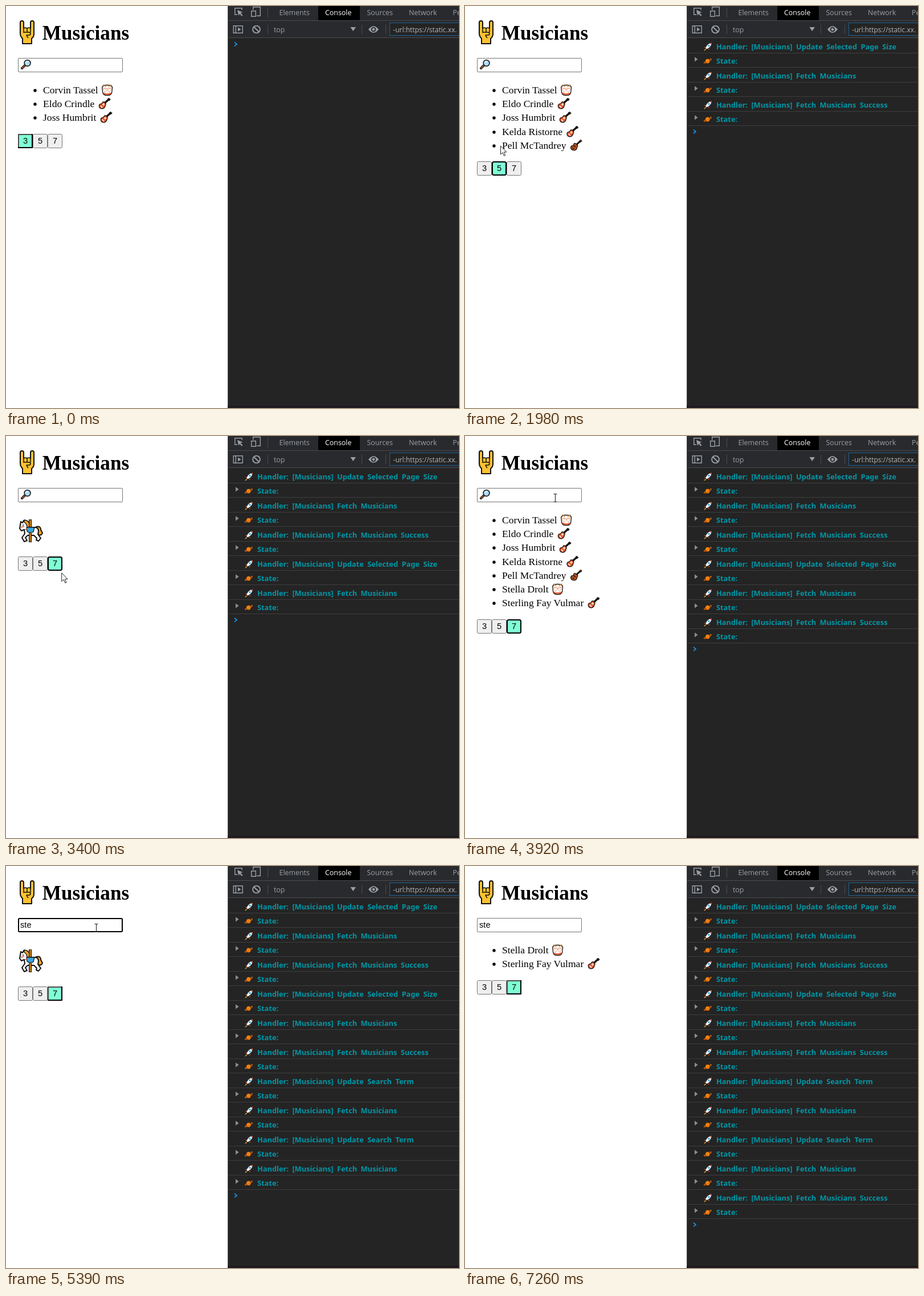
An HTML page that plays this animation: 795x704 px, repeating every 7340 ms.

```html
<!DOCTYPE html>
<html lang="en">
<head>
<meta charset="utf-8">
<title>Musicians</title>
<style>
  html, body { margin: 0; width: 100%; height: 100%; overflow: hidden; background: #fff; }
  svg { display: block; }
  .serif { font: 17.6px "Liberation Serif", serif; }
  .title { font: bold 35.2px "Liberation Serif", serif; }
  .field { font: 14.67px "Liberation Sans", sans-serif; }
  .tool { font: 12.4px "Open Sans", "Noto Sans", sans-serif; fill: #9aa0a6; }
  .log { font: bold 12.8px "Noto Sans", sans-serif; word-spacing: 3.1px; fill: #0097a7; }
  .line { fill: none; stroke: #9aa0a6; stroke-width: 1.4; }
  .rule { stroke: #3d3d3d; }
</style>
</head>
<body>
<svg id="stage" width="795" height="704" viewBox="0 0 795 704">
  <defs>
    <g id="guitar" stroke="#111" stroke-linejoin="round">
      <path d="M9 11L18 3" stroke-width="3.4"/>
      <path d="M16 2.2L18.5 .8L20.8 3.2L18.6 5.4Z" fill="#222"/>
      <path d="M7.6 7.6C9.5 6.4 13.6 9.8 12.6 12.2C11.8 13.6 11.8 14.6 11 16.6C9 20.6 2 20.4 1 15.4C.4 12 3 10.8 5 10.6C6.6 10.4 6.4 8.4 7.6 7.6Z" fill="#e0532b" stroke-width="1.2"/>
      <path d="M3.6 14.2L6.8 17.4" stroke="#fff" stroke-width="1.6"/>
      <circle cx="8.6" cy="12" r="1.9" fill="#f8d9b0" stroke="none"/>
    </g>
    <g id="violin" stroke="#111" stroke-linejoin="round">
      <path d="M9 11L18.6 2.4" stroke-width="3"/>
      <path d="M16.6 2L18.8 .8L20.6 3L18.4 5Z" fill="#8a3b16"/>
      <path d="M7 7.2C9.4 5.6 14.4 10.4 12.8 12.6C11.4 13.4 12.2 15.6 11 17.4C8.4 20.8 1.4 19.2 1 14.6C.8 11.6 3.2 10.8 4.8 10.8C6.4 10.4 5.6 8.4 7 7.2Z" fill="#b5501f" stroke-width="1.2"/>
      <path d="M4 14.4L6.4 16.8M6.5 10.8L9.4 13.7" stroke-width="1.3"/>
    </g>
    <g id="drum" stroke="#151515" stroke-linejoin="round">
      <path d="M1 6Q2 2 10 2Q18 2 19 6L18 15Q17 20 10 20Q3 20 2 15Z" fill="#fff" stroke-width="1.3"/>
      <path d="M2.5 14.8Q10 18.8 17.5 14.8L17 16.8Q15 19.3 10 19.3Q5 19.3 3 16.8Z" fill="#e0532b" stroke="none"/>
      <path d="M2.4 8L6 15L10 10L14 15L17.6 8" fill="none" stroke="#e8a070" stroke-width=".9"/>
      <path d="M2.4 6.6Q10 11 17.6 6.6" fill="none" stroke="#e0532b" stroke-width=".9"/>
      <path d="M2.4 1L8 5.6M17.6 1L12 5.6" stroke="#e8953a" stroke-width="1.4"/>
    </g>
    <g id="rocket" stroke-linejoin="round">
      <path d="M4 7L1 10L4.2 10.6M8.6 11.8L9.4 14.8L12 11" fill="#e0532b" stroke="#111" stroke-width=".7"/>
      <path d="M3.6 11.4L1 15.4L5 13" fill="#ffb92e"/>
      <path d="M15 1C10.6 1 6.4 4 3.8 10L6 12.4C12 9.6 15 5.6 15 1Z" fill="#eef4f8" stroke="#111" stroke-width=".7"/>
      <path d="M15 1L11.4 1.8L14.2 4.6Z" fill="#e0532b"/>
      <circle cx="10" cy="6" r="1.7" fill="#30a9df"/>
    </g>
    <g id="planet">
      <circle cx="7.8" cy="8" r="4.2" fill="#f7830d" stroke="#111" stroke-width=".6"/>
      <path d="M3.8 8.8C.4 11 .8 12.2 5 10.8C9.6 9.2 14.8 5.8 14.2 4.6C13.8 4 12.6 4.2 11.4 4.8" fill="none" stroke="#e06a12" stroke-width="1.2"/>
    </g>
    <path id="row-arrow" d="M403 89.2L408.6 93.3L403 97.4Z" fill="#8b8f94"/>
  </defs>

  <g id="page">
    <g stroke="#111" stroke-width="2" stroke-linejoin="round" fill="#fdc12f">
      <path d="M25 29Q25 26 28 26Q31 26 31 29V39H43V29Q43 26 46 26Q49 26 49 29V49Q49 54 45 57V66H29V57Q25 53 25 48Z"/>
      <path d="M31 47V40Q31 38 34 38Q37 38 37 40V46M37 46V40Q37 38 40 38Q43 38 43 40V46" stroke-width="1.5"/>
      <path d="M31 46H40Q43 46 43 48.5Q43 51 40 51H36Q37 54 39 56" fill="none" stroke-width="1.5"/>
    </g>
    <text class="title" x="63.7" y="58.7">Musicians</text>
    <rect id="box" rx="1.5" fill="#fff"/>
    <g id="lens" stroke-linecap="round">
      <path d="M28 109L33.4 103.8" stroke="#111" stroke-width="4"/>
      <path d="M28.2 108.8L32.6 104.6" stroke="#a05a2c" stroke-width="2"/>
      <circle cx="37.6" cy="100" r="5.4" fill="#a9dcf8" stroke="#222" stroke-width="1.7"/>
      <path d="M34.6 99Q36 96.6 38.4 96.8" fill="none" stroke="#fff" stroke-width="1.3"/>
    </g>
    <text id="typed" class="field" x="25" y="107.6"></text>
    <path id="squiggle" fill="none" stroke="#e03030"/>
    <rect id="caret" y="94" width="1" height="17"/>
    <g id="list"></g>
    <g id="horse" stroke="#111" stroke-width="2" stroke-linejoin="round">
      <path d="M53 159Q61 157 61 164L64 170Q62 175 57 173Q54 170 55 165Z" fill="#f7a823"/>
      <path d="M26 150L29 152L31 148L35 151Q40 154 40 160H51Q57 160 57 167L56 172L61 179L57 184L53 182L54 179L49 174H38L34 178L37 183L32 185L28 178L33 171L32 164L27 166L24 162Z" fill="#fff"/>
      <path d="M32 147Q42 148 42 159L37 160Q37 154 32 151Z" fill="#f7a823" stroke-width="1.4"/>
      <path d="M36 160H50L48 168Q41 171 37 167Z" fill="#35a7dd" stroke-width="1.2"/>
      <path d="M42.5 146V159M42.5 170V186" stroke-width="5"/>
      <path d="M42.5 146.5V159M42.5 170V185" stroke="#d98a1f" stroke-width="2.4"/>
      <path d="M26 160L32 158M33 164L37 163" stroke="#e0532b" stroke-width="1.5"/>
      <circle cx="30" cy="156" r="1" fill="#111" stroke="none"/>
    </g>
    <g id="buttons"></g>
  </g>

  <g id="tools">
    <rect x="389" width="406" height="704" fill="#242424"/>
    <rect x="389" width="406" height="55.5" fill="#292a2d"/>
    <rect x="548" width="73" height="25" fill="#000"/>
    <path d="M389 25.5H795M389 55.5H795" stroke="#494c50"/>
    <path d="M389.5 0V704" stroke="#45484c"/>
    <path d="M389 702H795" stroke="#1f1b20" stroke-width="4"/>
    <path d="M459.5 3V20M459.5 33V49M624.5 33V49M666.5 33V49" stroke="#494c50"/>
    <g class="line">
      <path d="M406 15H401.7V3.7H414V7"/>
      <path d="M406 7L415.5 11L411.6 12.2L415.5 16.2L413.8 17.8L410 13.8L408.2 17Z" fill="#9aa0a6" stroke="none"/>
      <path d="M433.7 7V1.7H446.3V17.3H440M430.7 8.7H438.3V18.3H430.7Z"/>
      <path d="M399.2 34.7H415.2V47.3H399.2ZM403.2 34.7V47.3"/>
      <path d="M407 37.4L412.4 41L407 44.6Z" fill="#9aa0a6" stroke="none"/>
      <circle cx="439.5" cy="41" r="6.4" stroke-width="1.9"/>
      <path d="M435 36.5L444 45.5" stroke-width="1.9"/>
      <path d="M604.5 37H614L609.2 44Z" fill="#9aa0a6" stroke="none"/>
      <path d="M636 41Q645 29.5 654 41Q645 52.5 636 41Z" fill="#9aa0a6" stroke="none"/>
      <circle cx="645" cy="41" r="3.4" fill="#9aa0a6" stroke="#292a2d" stroke-width="1.8"/>
    </g>
    <rect x="673.5" y="29.5" width="130" height="22" fill="#242424" stroke="#1d6296"/>
    <g class="tool">
      <text x="479.5" y="15.5">Elements</text>
      <text x="560" y="15.5" fill="#fff">Console</text>
      <text x="633.5" y="15.5">Sources</text>
      <text x="707" y="15.5">Network</text>
      <text x="784" y="15.5">Performance</text>
      <text x="470" y="45.5">top</text>
      <text x="679.3" y="45.5" style="font-size:12px;fill:#b4b8bd">-url:https://static.xx.</text>
    </g>
    <g id="log"></g>
    <path id="prompt" d="M401 -3.4L405 0L401 3.4" fill="none" stroke="#1f93e6" stroke-width="1.7"/>
  </g>

  <circle id="press" r="13" fill="#f9ef24" fill-opacity=".75"/>
  <path id="arrow" d="M0 0V15L3.5 11.8L6 17.6L8.2 16.6L5.8 11H10.4Z" fill="#fff" stroke="#222"/>
  <path id="beam" d="M-3 -6.5H-1L0 -5.5L1 -6.5H3M0 -5.5V6.5M-3 7.5H-1L0 6.5L1 7.5H3" fill="none" stroke="#222" stroke-width="1.1"/>
</svg>

<script>
const LOOP = 7340, ROW = 24.2, LINE = 25.5;
const $ = id => document.getElementById(id);

function set(el, attrs) {
  for (const key in attrs) el.setAttribute(key, attrs[key]);
}
function add(parent, tag, attrs = {}, text) {
  const el = document.createElementNS('http://www.w3.org/2000/svg', tag);
  set(el, attrs);
  if (text !== undefined) el.textContent = text;
  return parent.appendChild(el);
}
const show = (el, on) => el.style.display = on ? '' : 'none';
const move = (el, x, y) => el.setAttribute('transform', `translate(${x} ${y})`);
const at = (track, t) => track.filter(key => key[0] <= t).pop();
const within = (t, ...spans) => spans.some(([a, b]) => t >= a && t < b);
const lineY = i => Math.floor(LINE * i);

// Places a rect so that its border lies inside the given box
function frame(el, x, y, w, h, border) {
  set(el, {
    x: x + border / 2, y: y + border / 2,
    width: w - border, height: h - border, 'stroke-width': border
  });
}

// Timeline: each key is [ms, value...]
const shown = [[0, 0, 3], [970, 0, 0], [1520, 0, 5], [2930, 0, 0], [3470, 0, 7], [4700, 0, 0], [5630, 5, 7]];
const logged = [[0, 0], [970, 4], [1520, 6], [2930, 10], [3470, 12], [4700, 16], [5160, 20], [5630, 22]];
const selected = [[0, 0], [970, 1], [2930, 2]];
const typing = [[0, ''], [4390, 's'], [4700, 'st'], [4850, 'ste']];
// [start, steps, ms per step, from x, y, to x, y]
const moves = [
  [190, 8, 80, 266, 423, 62, 244],
  [1980, 10, 80, 62, 244, 81, 276],
  [3230, 10, 76.6, 81, 276, 158.5, 108]
];

const musicians = [
  ['Corvin Tassel', 'drum'], ['Eldo Crindle', 'guitar'], ['Joss Humbrit', 'guitar'],
  ['Kelda Ristorne', 'guitar'], ['Pell McTandrey', 'violin'], ['Stella Drolt', 'drum'],
  ['Sterling Fay Vulmar', 'guitar']
].map(([name, icon]) => {
  const g = add($('list'), 'g');
  add(g, 'circle', { cx: 51, cy: 148, r: 2.7 });
  const label = add(g, 'text', { class: 'serif', x: 65, y: 153 }, name);
  const gap = icon === 'drum' ? 6 : 7;
  add(g, 'use', { href: '#' + icon, x: 65 + label.getComputedTextLength() + gap, y: 136.5 });
  return g;
});

const buttons = [3, 5, 7].map((n, i) => {
  const g = add($('buttons'), 'g', { transform: `translate(${21 + 26 * i} 0)` });
  const face = add(g, 'rect');
  const edge = add(g, 'path', { d: 'M1 24V1H25', fill: 'none', stroke: '#4c4c4c', 'stroke-width': 2 });
  const shade = add(g, 'path', { d: 'M0 24H25V0', fill: 'none', stroke: '#000', 'stroke-width': 2 });
  add(g, 'text', { class: 'field', x: 13, y: 17.4, 'text-anchor': 'middle' }, n);
  return { face, edge, shade };
});

const [size, fetching, success, search] =
  ['Update Selected Page Size', 'Fetch Musicians', 'Fetch Musicians Success', 'Update Search Term'];
const actions = [size, fetching, success, size, fetching, success, search, fetching, search, fetching, success];
const lines = actions.flatMap(a => [`Handler: [Musicians] ${a}`, 'State:']).map((text, i) => {
  const g = add($('log'), 'g', { transform: `translate(0 ${lineY(i)})` });
  const state = i % 2;
  add(g, 'path', { class: 'rule', d: 'M390 82.5H795' });
  add(g, 'use', { href: state ? '#planet' : '#rocket', x: 418, y: 63.5 });
  if (state) add(g, 'use', { href: '#row-arrow', y: -25 });
  add(g, 'text', { class: 'log', x: 441, y: 76 }, text);
  return g;
});

$('squiggle').setAttribute('d', 'M25 110' + 'l2 -2l2 2'.repeat(5));

function pointer(t) {
  const m = at(moves, t);
  if (!m) return null;
  const [start, steps, ms, x0, y0, x1, y1] = m;
  const p = Math.min(1, (Math.floor((t - start) / ms) + 1) / steps);
  const e = p * p * (3 - 2 * p);
  return { x: x0 + (x1 - x0) * e, y: y0 + (y1 - y0) * e };
}

function styleButton({ face, edge, shade }, on, focus, hover, down) {
  frame(face, 0, 0, 26, 25, on ? 2 : 1);
  set(face, {
    rx: on ? (focus ? 2.5 : 0) : 2,
    fill: on ? '#7fffd4' : down ? '#f5f5f5' : hover ? '#e5e5e5' : '#efefef',
    stroke: on ? '#000' : '#767676'
  });
  show(edge, on && !focus);
  show(shade, on && !focus);
}

function draw(t) {
  const [, first, end] = at(shown, t);
  const loading = first === end;
  musicians.forEach((g, i) => {
    show(g, i >= first && i < end);
    move(g, 0, Math.round(ROW * (i - first)));
  });
  show($('horse'), loading);

  const top = loading ? 211 : Math.round(151.4 + ROW * (end - first));
  const mouse = pointer(t);
  const pressed = within(t, [900, 970], [2760, 2930]);
  const focused = within(t, [970, 2760], [2930, 4010]);
  move($('buttons'), 0, top);
  buttons.forEach((b, i) => {
    const x = 21 + 26 * i;
    const hover = mouse && mouse.x >= x && mouse.x < x + 26 && mouse.y >= top && mouse.y < top + 25;
    styleButton(b, i === at(selected, t)[1], focused, hover, hover && pressed);
  });

  const editing = within(t, [4010, 7260]);
  const value = at(typing, t)[1];
  frame($('box'), 21, 91, 184, 25, editing ? 2 : 1);
  $('box').setAttribute('stroke', editing ? '#000' : '#767676');
  show($('lens'), !value);
  $('typed').textContent = value;
  $('caret').setAttribute('x', 25 + Math.floor(value ? $('typed').getComputedTextLength() : 0));
  show($('caret'), within(t, [4160, 5390], [5860, 6490], [7020, 7260]));
  show($('squiggle'), within(t, [5860, 7260]));

  const count = at(logged, t)[1];
  lines.forEach((g, i) => show(g, i < count));
  move($('prompt'), 0, 67 + lineY(count));

  const beam = t >= 3470;
  show($('arrow'), mouse && !beam);
  show($('beam'), beam && t < 6170);
  show($('press'), pressed);
  if (mouse) for (const id of ['arrow', 'beam', 'press']) move($(id), mouse.x, mouse.y);
}

const begin = performance.now();
function tick() {
  draw((performance.now() - begin) % LOOP);
  requestAnimationFrame(tick);
}
tick();
</script>
</body>
</html>
```
